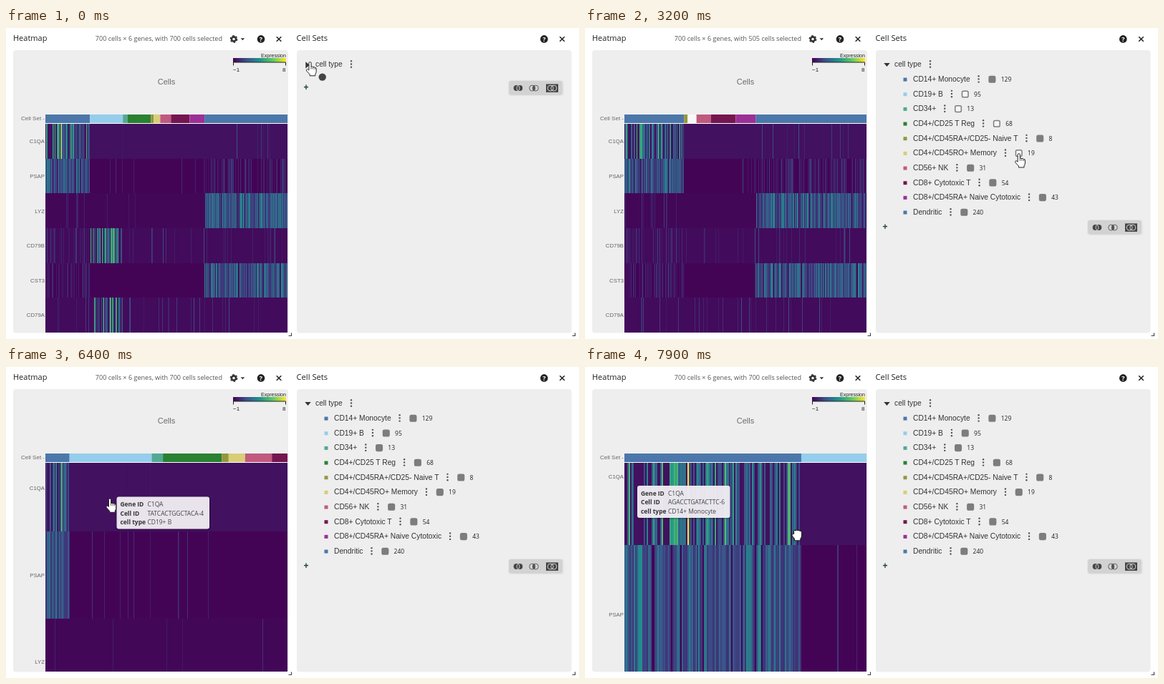
These frames come from a looping animation (800x435 px, 8 s). An HTML page with a canvas:

```html
<!DOCTYPE html>
<html lang="en">
<head>
<meta charset="utf-8">
<title>Heatmap and cell sets</title>
<style>
  html, body { margin: 0; width: 100%; height: 100%; overflow: hidden; background: #fff; }
  canvas, svg { position: absolute; left: 0; top: 0; width: 800px; height: 435px; }
  .ui { font-family: "Open Sans", "Noto Sans", sans-serif; }
  .plain { font-family: "Liberation Sans", Arial, sans-serif; }
  .end { text-anchor: end; }
  .mid { text-anchor: middle; }
  .ink { fill: #fff; stroke: #222; stroke-width: 1; stroke-linejoin: round; }
  text { white-space: pre; }
</style>
</head>
<body>
<canvas id="heat" width="800" height="435"></canvas>
<svg id="ui" viewBox="0 0 800 435">
  <defs>
    <linearGradient id="scale"></linearGradient>
    <clipPath id="rows"><rect x="10" y="134" width="45" height="292"/></clipPath>
    <g id="kebab" fill="#555">
      <circle cy="-4.2" r="1.2"/><circle r="1.2"/><circle cy="4.2" r="1.2"/>
    </g>
    <g id="rings">
      <circle cx="-2.3" r="4"/><circle cx="2.3" r="4"/>
    </g>
    <g id="tools">
      <rect x="-1" y="-.5" width="78" height="22" rx="4" opacity=".04"/>
      <rect width="75" height="20" rx="4" fill="#d2d2d2"/>
      <g transform="translate(13 10.3)">
        <use href="#rings" fill="#444"/>
        <ellipse rx="1.9" ry="3.5" fill="#444" stroke="#d2d2d2"/>
      </g>
      <g transform="translate(35 10.3)" fill="none" stroke="#555" stroke-width=".9">
        <use href="#rings"/>
        <ellipse rx="1.5" ry="3.2" fill="#555"/>
      </g>
      <g transform="translate(60.5 10.3)" fill="none" stroke="#d2d2d2">
        <rect x="-8.5" y="-5.7" width="17" height="11.5" fill="#444" stroke="none"/>
        <use href="#rings"/>
      </g>
    </g>
  </defs>
</svg>
<script>
const NS = 'http://www.w3.org/2000/svg';
const ui = document.getElementById('ui');
const ctx = document.getElementById('heat').getContext('2d');

const LOOP = 8000, STEP = 100;
const LEFT = 55, WIDTH = 338, TOP = 134.6, BOTTOM = 426, ROW = 48.6;

const SETS = [
  ['CD14+ Monocyte', 129, '#4c77aa'],
  ['CD19+ B', 95, '#95cdec'],
  ['CD34+', 13, '#52a994'],
  ['CD4+/CD25 T Reg', 68, '#2a8132'],
  ['CD4+/CD45RA+/CD25- Naive T', 8, '#93983c'],
  ['CD4+/CD45RO+ Memory', 19, '#d9cd78'],
  ['CD56+ NK', 31, '#c05a7e'],
  ['CD8+ Cytotoxic T', 54, '#751650'],
  ['CD8+/CD45RA+ Naive Cytotoxic', 43, '#9b3096'],
  ['Dendritic', 240, '#4c77aa']
].map(([name, size, color]) => ({ name, size, color }));

// Share of expressing cells and their highest level
const LEVELS = { none: [.005, .15], rare: [.08, .25], faint: [.5, .2], patchy: [.6, .72], dense: [.93, .5] };
// Gene, base level, then the pattern in monocytes, B cells, others and dendritic cells
const GENES = [
  ['C1QA', .05, 'patchy', 'none', 'none', 'rare'],
  ['PSAP', .01, 'dense', 'rare', 'rare', 'faint'],
  ['LYZ', .02, 'rare', 'none', 'none', 'dense'],
  ['CD79B', .03, 'faint', 'patchy', 'rare', 'rare'],
  ['CST3', .01, 'faint', 'none', 'none', 'dense'],
  ['CD79A', .03, 'rare', 'patchy', 'rare', 'rare']
];
const PEAK_CELL = 46;

const OPEN_AT = 400, RESET_AT = 3600;
const TOGGLES = [[1300, 2], [1800, 1], [2500, 3], [3200, 5]]; // time, set unchecked
const DRAGS = [[6900, 7300], [7600, LOOP]];

// time, left, top, zoom
const VIEW = [
  [5400, LEFT, TOP, 1], [6300, -67, 109, 2.5], [6500, -67, 109, 2.5],
  [6900, -147, 62, 3.96], [7300, -6, 79.5, 3.96], [7500, -6, 79.5, 3.96], [7900, LEFT, 57.3, 3.965]
];
// time, x, y of the fingertip once the sets are restored
const HOVER = [
  [RESET_AT, 470, 230], [4700, 237.5, 163], [5300, 136, 160], [6400, 145, 184], [6700, 72, 190],
  [6900, 72, 252], [7300, 207, 270], [7400, 207, 270], [7500, 225, 250], [7900, 295, 228]
];
// time, x, y, gene, cell, set
const TIPS = [
  [4100, 250, 224, 'LYZ', 'GACTTAGCCATGAC-2', 9],
  [4700, 116, 172, 'C1QA', 'TCAGAGACCAATCG-7', 7],
  [5200, 146, 157, 'C1QA', 'CATTGACAGGTACT-8', 1],
  [6400, 154.5, 181.5, 'C1QA', 'TATCACTGGCTACA-4', 1],
  [7400, 94.5, 317, 'PSAP', 'GCTGATGATTTACC-8', 0],
  [7500, 73, 166, 'C1QA', 'AGACCTGATACTTC-6', 0]
];

const VIRIDIS = ['440154', '3b528b', '21918c', '5ec962', 'fde725']
  .map(hex => hex.match(/../g).map(c => parseInt(c, 16)));

const mix = (a, b, k) => a + (b - a) * k;

function viridis(v) {
  const p = Math.min(v, 1) * 4, i = Math.min(3, Math.floor(p));
  return `rgb(${VIRIDIS[i].map((c, j) => Math.round(mix(c, VIRIDIS[i + 1][j], p - i)))})`;
}

function seeded(seed) {
  return () => {
    seed = seed + 0x6D2B79F5 | 0;
    let n = Math.imul(seed ^ seed >>> 15, 1 | seed);
    n = n + Math.imul(n ^ n >>> 7, 61 | n) ^ n;
    return ((n ^ n >>> 14) >>> 0) / 4294967296;
  };
}

// Linear interpolation between keys of the form [time, ...numbers]
function at(keys, t) {
  const i = keys.findIndex(k => k[0] > t);
  if (i <= 0) return keys.at(i).slice(1);
  const a = keys[i - 1], b = keys[i], k = (t - a[0]) / (b[0] - a[0]);
  return a.slice(1).map((v, j) => mix(v, b[j + 1], k));
}

function add(tag, attrs = {}, parent = ui) {
  const el = document.createElementNS(NS, tag);
  for (const key in attrs) el.setAttribute(key, attrs[key]);
  parent.appendChild(el);
  return el;
}

function label(str, x, y, size, cls, fill = '#333', parent = ui, weight = 400) {
  const el = add('text', { x, y, 'font-size': size, class: cls, fill, 'font-weight': weight }, parent);
  el.textContent = str;
  return el;
}

const show = (el, on) => el.setAttribute('display', on ? 'inline' : 'none');
const move = (el, x, y) => el.setAttribute('transform', `translate(${x} ${y})`);

// Expression values, one row per gene
const kindOf = g => g < 2 ? g : g === SETS.length - 1 ? 3 : 2;
const cellSet = SETS.flatMap((s, g) => Array(s.size).fill(g));
const values = GENES.map(([, base, ...kinds], row) => {
  const rnd = seeded(row * 977 + 31);
  return cellSet.map(g => {
    const [share, peak] = LEVELS[kinds[kindOf(g)]];
    const hit = rnd() < share, r = rnd();
    return hit ? mix(peak * .3, peak, r * r) : base;
  });
});
values[0][PEAK_CELL] = 1;

const strip = document.createElement('canvas');
strip.height = GENES.length;
let stripKey = null;

// One pixel per visible cell and gene
function buildStrip(hidden) {
  const key = hidden.join();
  if (key === stripKey) return;
  stripKey = key;
  const cells = [...cellSet.keys()].filter(i => !hidden.includes(cellSet[i]));
  strip.width = cells.length;
  const c = strip.getContext('2d');
  values.forEach((row, y) => cells.forEach((cell, x) => {
    c.fillStyle = viridis(row[cell]);
    c.fillRect(x, y, 1, 1);
  }));
}

function panel(x, w) {
  ctx.fillStyle = '#eee';
  ctx.beginPath();
  ctx.roundRect(x, 31, w, 395.5, 4);
  ctx.fill();
}

function drawHeat(hidden, off, [x0, y0, zoom]) {
  buildStrip(hidden);
  ctx.clearRect(0, 0, 800, 435);
  panel(10, 384);
  panel(406, 383.5);
  ctx.save();
  ctx.beginPath();
  ctx.rect(LEFT, 121, WIDTH, BOTTOM - 121);
  ctx.clip();
  ctx.fillStyle = '#fff';
  ctx.fillRect(LEFT, 121, WIDTH, 14);

  const unit = WIDTH * zoom / strip.width;
  let x = x0;
  SETS.forEach((s, g) => {
    if (hidden.includes(g)) return;
    ctx.fillStyle = off.includes(g) ? '#f8f8f8' : s.color;
    ctx.fillRect(x, 121, s.size * unit, 12);
    x += s.size * unit;
  });

  ctx.beginPath();
  ctx.rect(LEFT, 134, WIDTH, BOTTOM - 134);
  ctx.clip();
  ctx.imageSmoothingEnabled = false;
  const edge = i => Math.floor(y0 + i * ROW * zoom);
  GENES.forEach((gene, i) =>
    ctx.drawImage(strip, 0, i, strip.width, 1, x0, edge(i), WIDTH * zoom, edge(i + 1) - edge(i)));
  ctx.restore();
}

// Title bars
function corner(x) {
  add('path', { d: `M${x} 430.5h4v-4`, fill: 'none', stroke: '#444', 'stroke-width': 1.2 });
}
function helpAndClose(x1, x2) {
  add('circle', { cx: x1, cy: 15.4, r: 5.3, fill: '#222' });
  label('?', x1, 18.6, 9, 'ui mid', '#fff', ui, 700);
  add('path', { d: `M${x2 - 3.3} 12.2l6.6 6.6m0-6.6l-6.6 6.6`, stroke: '#222', 'stroke-width': 1.5 });
}
label('Heatmap', 10, 18, 11, 'ui', '#222');
label('Cell Sets', 405.5, 18, 11.2, 'ui', '#222');
const summary = label('', 302, 18.3, 9.07, 'ui end', '#555');
const gear = { cx: 318, cy: 15.5, fill: 'none', stroke: '#333' };
add('circle', { ...gear, r: 3.1, 'stroke-width': 2.6 });
add('circle', { ...gear, r: 4.7, 'stroke-width': 1.5, 'stroke-dasharray': 2.46 });
add('path', { d: 'M327.6 14.2h5.6l-2.8 3z', fill: '#333' });
helpAndClose(356, 381);
helpAndClose(751.3, 776.5);
corner(394.5);
corner(790.5);

// Colour legend
VIRIDIS.forEach((c, i) => add('stop', { offset: i / 4, 'stop-color': `rgb(${c})` }, document.getElementById('scale')));
label('Expression', 391, 40.8, 7.1, 'plain end', '#222');
add('rect', { x: 317, y: 42, width: 74, height: 6, fill: 'url(#scale)' });
add('path', { d: 'M317.5 52.5v-4.5h73v4.5', fill: 'none', stroke: '#222' });
label('−1', 317, 60.8, 8, 'plain', '#222');
label('8', 390.5, 60.8, 8, 'plain end', '#222');

label('Cells', 224, 79.2, 11, 'plain mid', '#6a6a6a');
label('Cell Set -', 54, 129.3, 8, 'plain end', '#666');
const geneBox = add('g', { 'clip-path': 'url(#rows)' });
const geneLabels = GENES.map(g => label(g[0], 54, 0, 7.8, 'plain end', '#666', geneBox));

// Cell set tree
const arrow = add('path', { fill: '#333' });
label('cell type', 432, 54.2, 10.25, 'plain');
move(add('use', { href: '#kebab' }), 482, 50.5);
const levelDot = add('circle', { cx: 441.7, cy: 68.6, r: 5.2, fill: '#444' });
const list = add('g');
const boxes = SETS.map((s, i) => {
  const row = add('g', {}, list), y = 71.4 + i * 20.66;
  move(row, 0, y);
  add('rect', { x: 444.5, y: -1.8, width: 5, height: 5, fill: s.color }, row);
  const name = label(s.name, 458, 3.6, 10.27, 'plain', '#333', row);
  const menu = 470 + name.getComputedTextLength(), x = menu + 18.8;
  move(add('use', { href: '#kebab' }, row), menu, 0);
  const el = add('rect', { x: x - 4.3, y: -3.9, width: 8.6, height: 8.6, rx: 1.8, stroke: '#7d7d7d', 'stroke-width': 1.5 }, row);
  label(s.size, x + 12.3, 3.6, 8.5, 'ui', '#222', row);
  return { el, x, y };
});
const footer = add('g');
label('+', 419, 4.2, 12, 'plain mid', '#1f4444', footer, 700);
add('use', { href: '#tools', x: 702, y: -8.5 }, footer);

// The cursor rests on each checkbox around its click, then hovers over the heatmap
const cursorPath = [
  [0, 424.5, 47.5], [OPEN_AT + STEP, 424.5, 47.5],
  ...TOGGLES.flatMap(([time, g]) => [-STEP, STEP].map(d => [time + d, boxes[g].x, boxes[g].y + 1])),
  [RESET_AT - 1, boxes[5].x, boxes[5].y + 1],
  ...HOVER
];

// Tooltip and cursor
const tip = add('g');
add('rect', { x: -1, width: 132, height: 47, rx: 4, opacity: .2 }, tip);
add('rect', { width: 129.5, height: 45, rx: 3, fill: '#f3eff5', opacity: .95 }, tip);
const tipText = ['Gene ID', 'Cell ID', 'cell type'].map((name, i) => {
  const y = 13.6 + i * 12.6;
  label(name, 5, y, 8.45, 'ui', '#333', tip, 700);
  return label('', 43, y, 8.45, 'ui', '#444', tip);
});
const hand = add('g');
add('path', { class: 'ink', d: 'M4 12V2a1.6 1.6 0 0 1 3.2 0v5q1.6-.9 2.6.5q1.5-.8 2.5.7q2-.4 2 1.5v4q0 2-1.4 3.8v2.2H5.3v-1.9L1 13.2q-1.3-2.5.6-2.8q1.2.2 2.4 1.6z' }, hand);
add('path', { d: 'M7.2 7v3.5M9.8 7.6v3M12.3 8.4v2.4', stroke: '#222', 'stroke-width': .8 }, hand);
const fist = add('g');
add('path', { class: 'ink', transform: 'scale(1.2) translate(.6 -5.6)', d: 'M-3.5 5V1.8q1-1.8 2.3-.4q1-1.8 2.4-.2q1.5-1.3 2.3.5q2-.5 2.2 1.4v4.4q0 2-1.4 3.4v2h-7v-1.7l-2.6-3.4q-1.2-3 1.8-2.8z' }, fist);

function draw(t) {
  const uncheckedBy = time => t < RESET_AT ? TOGGLES.filter(e => e[0] <= time).map(e => e[1]) : [];
  const off = uncheckedBy(t), hidden = uncheckedBy(t - STEP);
  const view = at(VIEW, t), [, y0, zoom] = view;
  drawHeat(hidden, off, view);

  const count = SETS.reduce((n, s, g) => off.includes(g) ? n : n + s.size, 0);
  summary.textContent = `700 cells × 6 genes, with ${count} cells selected`;
  geneLabels.forEach((el, i) => el.setAttribute('y', y0 + (i + .5) * ROW * zoom + 2.5));

  const open = t >= OPEN_AT;
  arrow.setAttribute('d', open ? 'M417.3 49h8.4l-4.2 5z' : 'M418.3 47.2l5.6 4.6l-5.6 4.6z');
  show(list, open);
  show(levelDot, !open);
  move(footer, 0, open ? 277.3 : 82.3);
  boxes.forEach(({ el }, g) => el.setAttribute('fill', off.includes(g) ? '#f6f6f6' : '#7d7d7d'));

  const hovered = TIPS.findLast(e => e[0] <= t);
  show(tip, hovered);
  if (hovered) {
    const [, x, y, gene, cell, set] = hovered;
    move(tip, x, y);
    [gene, cell, SETS[set].name].forEach((str, i) => tipText[i].textContent = str);
  }

  const [cx, cy] = at(cursorPath, t);
  const dragging = DRAGS.some(([a, b]) => t >= a && t < b);
  show(hand, !dragging);
  show(fist, dragging);
  move(hand, cx - 5.6, cy - .4);
  move(fist, cx, cy + 6);
}

let last = -1;
function tick() {
  const t = Math.floor(performance.now() % LOOP / STEP) * STEP;
  if (t !== last) draw(last = t);
  requestAnimationFrame(tick);
}
tick();
</script>
</body>
</html>
```
